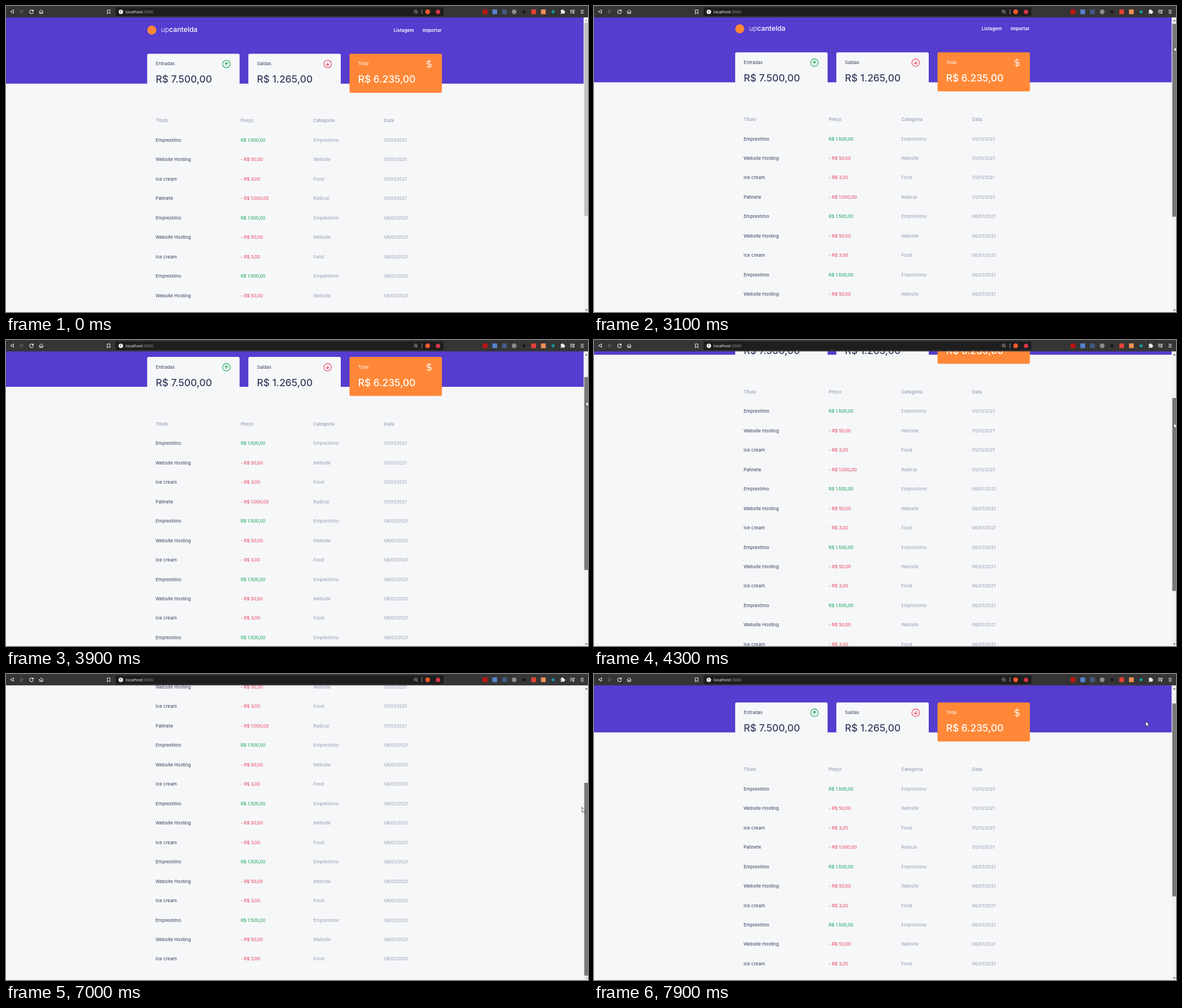
Animation of 1031 by 543 pixels, one loop 8000 ms. Source, as an HTML page:

```html
<!DOCTYPE html>
<html lang="pt">
<head>
<meta charset="utf-8">
<title>Listagem</title>
<style>
  html, body { margin: 0; width: 100%; height: 100%; overflow: hidden; background: #f6f7f9; }
  svg { display: block; width: 100vw; height: 100vh; font-family: Inter, "Open Sans", sans-serif; }
  text { white-space: pre; }
  .line { fill: none; stroke-linecap: round; stroke-linejoin: round; }
</style>
</head>
<body>
<svg id="stage" viewBox="0 0 1031 543">
  <rect width="1031" height="543" fill="#f6f7f9"/>
  <g id="page"></g>
  <g id="scrollbar">
    <rect x="1023.5" y="20" width="7.5" height="523" fill="#f1f1f1"/>
    <path id="up" d="M1025.7 27.2h4.6l-2.3-2.5z"/>
    <path id="down" d="M1025.7 538.6h4.6l-2.3 2.5z"/>
    <rect id="thumb" x="1024.4" y="30" width="6.6" height="342.3"/>
  </g>
  <g id="bar"></g>
  <path id="cursor" d="M0 0V9L2.1 7.1 3.5 10.2 5 9.5 3.7 6.5H6.5Z" fill="#fff" stroke="#111" stroke-width=".65"/>
</svg>
<script>
const NS = "http://www.w3.org/2000/svg";
const $ = id => document.getElementById(id);
const LOOP = 8000, STEP = 100;
const MAX_SCROLL = 249.5, TRAVEL = 163, GRIP = 70, LAG = 40, PRESS = 2500;
const INK = "#363f5f", MUTED = "#969cb3", GREEN = "#12a454", RED = "#e83f5b", ORANGE = "#ff8838";
const PAPER = "#f6f7f9", WHITE = "#eee", BAR = "#353535", FIELD = "#1e1e1e";

function add(parent, tag, attrs, content) {
  const el = document.createElementNS(NS, tag);
  for (const key in attrs) el.setAttribute(key, attrs[key]);
  if (content) el.textContent = content;
  parent.appendChild(el);
  return el;
}
const rect = (g, x, y, width, height, fill, rx = 0) => add(g, "rect", { x, y, width, height, fill, rx });
const disc = (g, cx, cy, r, fill) => add(g, "circle", { cx, cy, r, fill });
const ring = (g, cx, cy, r, stroke, width) =>
  add(g, "circle", { cx, cy, r, stroke, "stroke-width": width, fill: "none" });
const line = (g, d, stroke, width = 1, more = {}) =>
  add(g, "path", { d, stroke, "stroke-width": width, class: "line", ...more });
const label = (g, x, y, content, fill, size = 8.1, weight = 400, spacing = 0) =>
  add(g, "text", { x, y, fill, "font-size": size, "font-weight": weight, "letter-spacing": spacing }, content);

function drawCard(g, i, title, amount, fill, ink) {
  const x = 250.1 + 179.2 * i;
  rect(g, x, 84.7, 163.7, 69.3, fill, 2.4);
  label(g, x + 15.2, 105.3, title, ink);
  label(g, x + 15.2, 136.3, amount, ink, 17.4, 450);
}

function drawArrow(g, x, color, dir) {
  ring(g, x, 103, 6.7, color, 1.1);
  line(g, `M${x} ${103 + 2.8 * dir}V${103 - 2.8 * dir}m-2.7 ${2.7 * dir}l2.7 ${-2.7 * dir} 2.7 ${2.7 * dir}`, color, 1.1);
}

function drawPage(g) {
  rect(g, 0, 20, 1023.5, 117.8, "#563ccf");
  disc(g, 258.3, 42.8, 8, ORANGE);
  const brand = label(g, 274.6, 46.2, "", "#fff", 12.2);
  add(brand, "tspan", { "font-weight": 300 }, "up");
  add(brand, "tspan", { "font-weight": 500 }, "cantelda");
  label(g, 686.8, 45.5, "Listagem", "#fff", 8.1, 600);
  label(g, 738, 45.5, "Importar", "#fff", 8.1, 600);

  drawCard(g, 0, "Entradas", "R$ 7.500,00", PAPER, INK);
  drawCard(g, 1, "Saídas", "R$ 1.265,00", PAPER, INK);
  drawCard(g, 2, "Total", "R$ 6.235,00", ORANGE, "#fff");
  drawArrow(g, 390.5, GREEN, 1);
  drawArrow(g, 569.8, RED, -1);
  line(g, "M12 1V23M17 5H9.5a3.5 3.5 0 0 0 0 7h5a3.5 3.5 0 0 1 0 7H6", "#fff", 1.7,
    { transform: "translate(741.4 95) scale(.67)" });

  const columns = [265, 415.8, 544.3, 669.8];
  ["Título", "Preço", "Categoria", "Data"].forEach((name, i) =>
    label(g, columns[i], 206.4, name, MUTED, 8.1, 500));

  const kinds = {
    E: ["Emprestimo", "R$ 1.500,00", "Emprestimo"],
    W: ["Website Hosting", "- R$ 50,00", "Website"],
    I: ["Ice cream", "- R$ 3,00", "Food"],
    P: ["Patinete", "- R$ 1.000,00", "Radical"]
  };
  [..."EWIPEWIEWIEWIEWI"].forEach((kind, i) => {
    const [title, price, category] = kinds[kind];
    const day = i < 4 ? "01" : i < 13 ? "06" : "08";
    const y = 240.9 + 34.47 * i;
    label(g, columns[0], y, title, INK);
    label(g, columns[1], y, price, kind === "E" ? GREEN : RED, 8.1, 400, -.15);
    label(g, columns[2], y, category, MUTED);
    label(g, columns[3], y, day + "/01/2021", MUTED, 8.1, 400, -.08);
  });
}

function drawAddress(g) {
  rect(g, 194, 2.6, 581, 15.4, FIELD, 2);
  disc(g, 203.4, 10.3, 3.9, "#fff");
  line(g, "M203.4 8.2V10.6M203.4 12.3V12.4", FIELD);
  const address = label(g, 211.8, 13, "", "#fff", 7.3);
  address.setAttribute("font-family", "'Open Sans', sans-serif");
  add(address, "tspan", {}, "localhost");
  add(address, "tspan", { fill: "#999" }, ":3000");
  ring(g, 725.6, 9.7, 2.7, "#bbb", .8);
  line(g, "M727.6 11.7 729.4 13.5M724.4 9.7H726.8M736.8 6.2V14", "#bbb", .8);
  disc(g, 747, 10.2, 4.2, "#f4582c");
  disc(g, 765.3, 10.4, 3.9, "#d2374a");
}

function drawBar(g) {
  rect(g, 0, 0, 1031, 20.2, BAR);
  line(g, "M13.3 7.2V13L8.2 10.1Z", WHITE);
  line(g, "M25.7 7.2V13L30.8 10.1Z", "#777", .9);
  line(g, "M47.6 8A3.3 3.3 0 1 0 48.4 11M48.4 6.7V8.9H46.2", WHITE, 1.1);
  line(g, "M58.6 10.2 62.3 6.8 66 10.2M59.7 9.8V13.5H61.4V11.3H63.2V13.5H64.9V9.8", WHITE);
  line(g, "M179.8 7H184.2V13.6L182 11.9 179.8 13.6Z", WHITE);
  drawAddress(g);

  const extensions = ["#bd1712", "#5583cf", "#435a82", "#8b8b8b", "#171717", "#e34235", "#ef8f57", "#159aa0"];
  extensions.forEach((color, i) => {
    const size = i === 4 || i === 7 ? 5.4 : 8.4;
    const round = i === 3 || size < 8;
    rect(g, 848.5 + 17.24 * i - size / 2, 10.3 - size / 2, size, size, color, round ? size / 2 : 0);
  });

  rect(g, 982.6, 7.6, 6.4, 6.4, WHITE, .8);
  disc(g, 985.6, 7.3, 1.4, WHITE);
  disc(g, 989.2, 10.7, 1.4, WHITE);
  disc(g, 982.8, 11, 1, BAR);
  disc(g, 985.8, 13.8, 1, BAR);
  line(g, "M999.7 7.4H1005M999.7 9.7H1005M999.7 12H1002.5M1006 12.3V7.5H1007.5", WHITE);
  disc(g, 1005, 12.4, 1.2, WHITE);
  line(g, "M1018.3 7.6h4.7m-4.7 2.6h4.7m-4.7 2.6h4.7", WHITE);
}

// Each pointer move: start, end, target x and y, power of the ease-in.
const ENTRY = { x: 26, y: 1, time: 200 };
const moves = [
  [200, 400, 440, 69, 1],
  [600, 800, 1026, 58, 1],
  [1200, 1400, 998, 62, 1],
  [1400, 1600, 1032, 65, 1],
  [1800, 2100, 1027.5, GRIP, 1],
  [2800, 5100, 1026.5, 271, 2.23],
  [6200, 6500, 1028.5, 265, 1],
  [6650, 7900, 977.3, 84, 1.45]
];

function pointer(t) {
  let { x, y } = ENTRY;
  for (const [start, end, toX, toY, power] of moves) {
    if (t <= start) break;
    const p = Math.min(1, (t - start) / (end - start)) ** power;
    x += (toX - x) * p;
    y += (toY - y) * p;
  }
  return { x, y };
}

// The thumb follows the held pointer slightly late.
function thumbOffset(t) {
  if (t < PRESS) return 0;
  return Math.max(0, Math.min(TRAVEL, pointer(t - LAG).y - GRIP));
}

function thumbColor(t, x) {
  if (t >= PRESS) return "#787878";
  return x >= 1024 && x < 1031 ? "#a8a8a8" : "#c1c1c1";
}

function render(time) {
  const t = Math.floor(time % LOOP / STEP) * STEP;
  const { x, y } = pointer(t);
  const offset = thumbOffset(t);
  $("page").setAttribute("transform", `translate(0 ${-offset / TRAVEL * MAX_SCROLL})`);
  $("thumb").setAttribute("y", 30 + offset);
  $("thumb").setAttribute("fill", thumbColor(t, x));
  $("up").setAttribute("fill", offset > 0 ? "#505050" : "#a3a3a3");
  $("down").setAttribute("fill", offset < TRAVEL ? "#505050" : "#a3a3a3");
  $("cursor").setAttribute("transform", `translate(${x} ${y})`);
  $("cursor").setAttribute("visibility", t < ENTRY.time ? "hidden" : "visible");
}

drawPage($("page"));
drawBar($("bar"));
const start = performance.now();
function tick() {
  render(performance.now() - start);
  requestAnimationFrame(tick);
}
tick();
</script>
</body>
</html>
```
